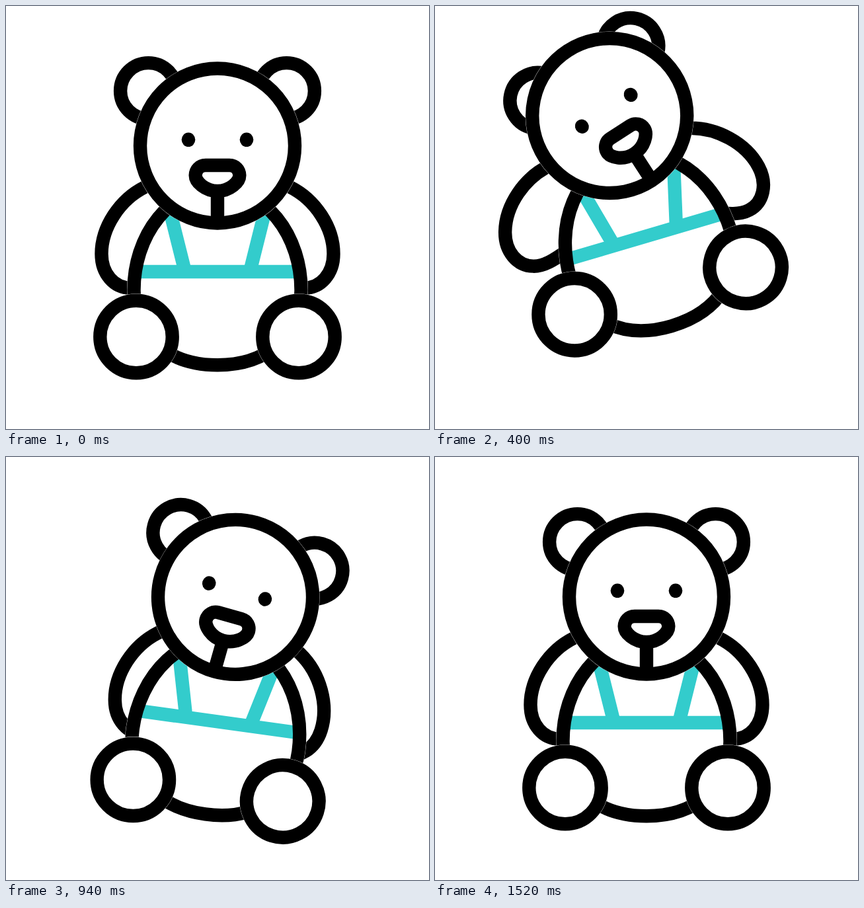
Animation, 640 px wide and 640 px high, one loop 1860 ms. Source, as an HTML page:

```html
<!DOCTYPE html>
<html lang="en">
<head>
<meta charset="utf-8">
<title>Rocking teddy bear</title>
<style>
  html, body { margin: 0; width: 100%; height: 100%; overflow: hidden; background: #fff; }
  svg { display: block; width: 100vw; height: 100vh; }
  .ink { fill: none; stroke: #000; stroke-width: 20.4; }
  .gap { fill: #fff; stroke: #fff; stroke-width: 21; }
  .cloth { fill: none; stroke: #3cc; stroke-width: 20.4; }
</style>
</head>
<body>
<svg viewBox="0 0 640 640">
  <defs>
    <path id="arm" d="M402 263 Q416 267 430 274 C468 293 495.5 335 495.5 375 C495.5 405.5 476 426.5 452 426.5 C436 426.5 420 416 404 404 L380 384"/>
    <path id="torso" d="M193.5 430 A126.5 155 0 0 1 446.5 430 C446.5 498 396 543.2 320 543.2 C244 543.2 193.5 498 193.5 430 Z"/>
    <circle id="skull" cx="320" cy="211.5" r="117"/>
    <circle id="foot" r="54.7"/>
  </defs>
  <g id="bear">
    <g id="armL"><use href="#arm" class="ink" transform="translate(640 0) scale(-1 1)"/></g>
    <g id="armR"><use href="#arm" class="ink"/></g>

    <use href="#torso" class="gap"/>
    <path class="cloth" d="M198 402 H442 M271 402 L247 306 M369 402 L393 306"/>
    <use href="#torso" class="ink"/>

    <g id="head">
      <circle id="earL" class="ink" cx="215.5" cy="128.5" r="42.4"/>
      <circle id="earR" class="ink" cx="424.5" cy="128.5" r="42.4"/>
      <use href="#skull" class="gap"/>
      <use href="#skull" class="ink"/>
      <ellipse cx="276" cy="202.3" rx="10.3" ry="10.8"/>
      <ellipse cx="364" cy="202.3" rx="10.3" ry="10.8"/>
      <path class="ink" d="M302 241 H338 C347 241 353.3 248 353.3 256.5 C353.3 266 339 280 320 280 C301 280 286.7 266 286.7 256.5 C286.7 248 293 241 302 241 Z M320 282 V324"/>
    </g>

    <g id="legL">
      <use href="#foot" class="gap" x="197" y="500.5"/>
      <use href="#foot" class="ink" x="197" y="500.5"/>
    </g>
    <g id="legR">
      <use href="#foot" class="gap" x="443" y="500.5"/>
      <use href="#foot" class="ink" x="443" y="500.5"/>
    </g>
  </g>
</svg>
<script>
const LOOP = 1860;
const SWING = [0, 560, 880, 1140, 1420];
const LAG = 100;
const EAR_TIMES = [0, 160, 400, 560, 640, 940, 1120, 1500];

const part = {};
for (const id of ['bear', 'armL', 'armR', 'head', 'earL', 'earR', 'legL', 'legR']) {
  part[id] = document.getElementById(id);
}

// cubic-bezier(.37, 0, .63, 1)
function ease(x) {
  let lo = 0, hi = 1;
  for (let i = 0; i < 24; i++) {
    const s = (lo + hi) / 2, r = 1 - s;
    if (1.11 * r * r * s + 1.89 * r * s * s + s * s * s < x) lo = s; else hi = s;
  }
  return lo * lo * (3 - 2 * lo);
}

// Swings through three peaks and settles at zero
function swing(t, peaks) {
  const v = [0, ...peaks, 0];
  if (t <= 0) return 0;
  for (let i = 1; i < v.length; i++) {
    if (t < SWING[i]) {
      const x = (t - SWING[i - 1]) / (SWING[i] - SWING[i - 1]);
      return v[i - 1] + (v[i] - v[i - 1]) * ease(x);
    }
  }
  return 0;
}

// Monotone cubic through the ear knots, at rest on both ends
function track(t, knots) {
  const T = EAR_TIMES, v = [0, ...knots, 0], n = T.length;
  if (t >= T[n - 1]) return 0;
  const rate = i => (v[i + 1] - v[i]) / (T[i + 1] - T[i]);
  const slope = i => {
    if (i === 0 || i === n - 1) return 0;
    const a = rate(i - 1), b = rate(i);
    return a * b > 0 ? 2 * a * b / (a + b) : 0;
  };
  let i = 0;
  while (t >= T[i + 1]) i++;
  const h = T[i + 1] - T[i], s = (t - T[i]) / h, r = 1 - s;
  return v[i] * (1 + 2 * s) * r * r + v[i + 1] * s * s * (3 - 2 * s)
    + h * s * r * (slope(i) * r - slope(i + 1) * s);
}

const earL = {
  x: [6, 25.9, 30, 28, -1.1, 4.2],
  y: [1, 4.9, 8, 9.9, 11.7, -4.9]
};
const earR = {
  x: [-3, -20.5, -31, -33.4, 0.1, 1.8],
  y: [4.1, 11.7, 12.5, 10.6, 12.1, 1.3]
};

const set = (id, value) => part[id].setAttribute('transform', value);
const turn = (angle, x, y) => `rotate(${angle.toFixed(3)} ${x} ${y})`;
const shift = (x, y) => `translate(${x.toFixed(3)} ${y.toFixed(3)})`;

function draw(t) {
  const tilt = swing(t, [-20.1, 9.8, -5.3]);
  const lift = swing(t, [-65.6, 1.2, -19.8]);
  const drag = swing(t - LAG, [-21.1, 11, -5.2]);

  set('bear', shift(0, lift) + turn(tilt, 320, 409));
  set('head', turn(tilt * 1.01, 320, 211.5));
  set('earL', shift(track(t, earL.x), track(t, earL.y)));
  set('earR', shift(track(t, earR.x), track(t, earR.y)));
  set('armL', turn(-tilt * 1.06, 262, 271));
  set('armR', turn(drag, 378, 271));
  set('legL', turn(-tilt, 244.4, 448.2));
  set('legR', turn(drag, 395.6, 448.2));
}

const start = performance.now();
function frame() {
  draw((performance.now() - start) % LOOP);
  requestAnimationFrame(frame);
}
frame();
</script>
</body>
</html>
```
